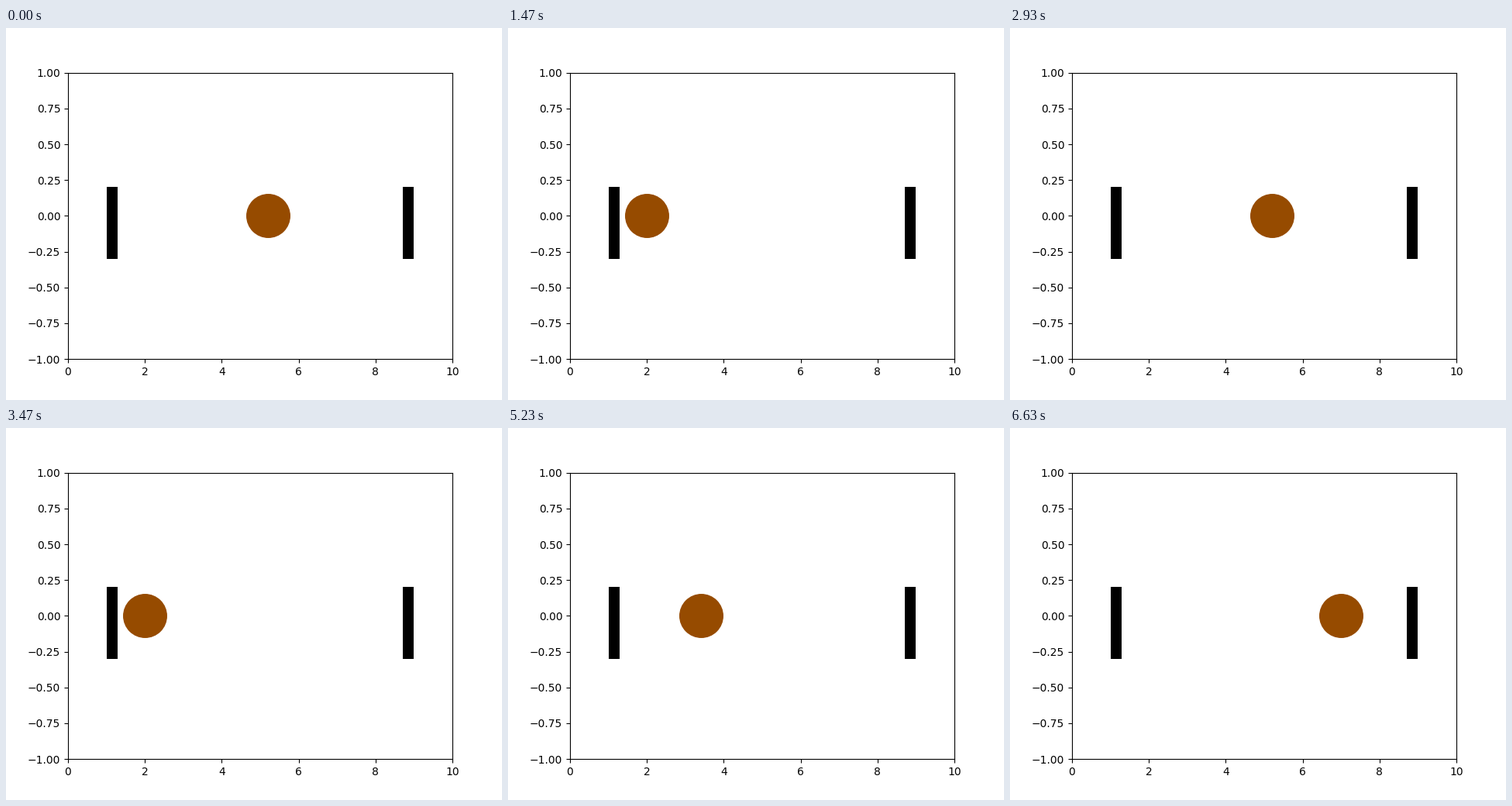
A matplotlib script that plays this animation: 640 by 480 pixels, repeating every 6.66 s.

```python
import matplotlib.pyplot as plt
from matplotlib.animation import FuncAnimation
from matplotlib.patches import Rectangle

FRAMES = 200
LOOP_MS = 6660
LEFT, RIGHT, STEP = 2.0, 8.0, 0.2
HALF = round((RIGHT - LEFT) / STEP)  # steps for one crossing
START = 16                           # steps already taken at the first frame


def ball_x(i):
    """Constant speed back and forth between LEFT and RIGHT."""
    phase = (i + START) % (2 * HALF)
    return LEFT + STEP * (HALF - abs(HALF - phase))


fig, ax = plt.subplots(figsize=(6.4, 4.8), dpi=100)
ax.set_xlim(0, 10)
ax.set_ylim(-1, 1)

for x in (1.0, 8.7):
    ax.add_patch(Rectangle((x, -0.3), 0.3, 0.5, facecolor="black"))

ball, = ax.plot([ball_x(0)], [0], "o", color="#964B00", markersize=40)


def update(i):
    ball.set_data([ball_x(i)], [0])
    return ball,


anim = FuncAnimation(fig, update, frames=FRAMES, interval=LOOP_MS / FRAMES,
                     repeat=True, repeat_delay=0)
plt.show()
```
